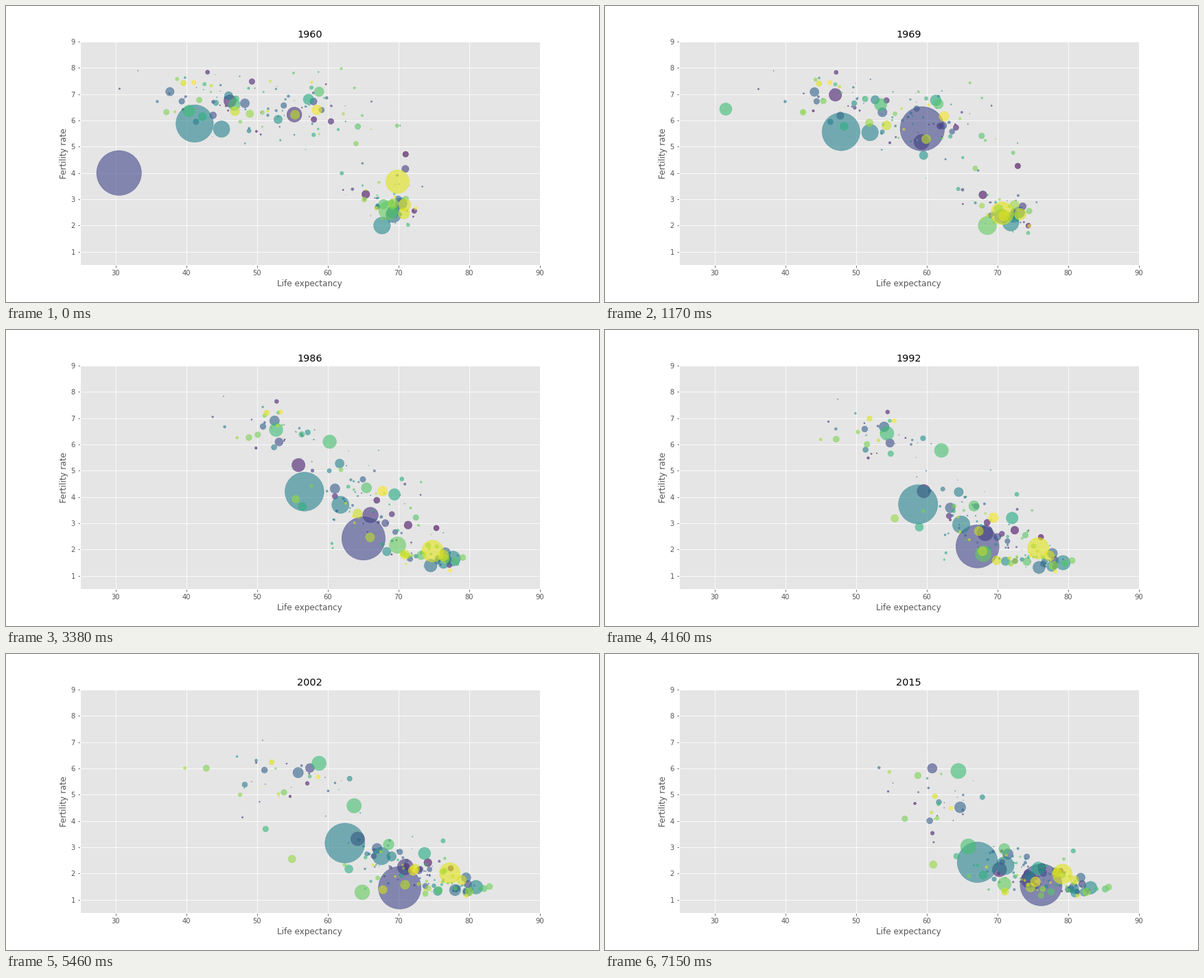
Recreate the animation shown at these times as a matplotlib script. Size 864 px wide and 432 px high, loop 7.28 s.

```python
import numpy as np
import matplotlib.pyplot as plt
from matplotlib.animation import FuncAnimation

FIRST, LAST, STEP_MS = 1960, 2015, 130
years = np.arange(FIRST, LAST + 1)
progress = (years - FIRST) / (LAST - FIRST)
rng = np.random.default_rng(12)
bubbles = []


def add(hue, r0, r1, life, births):
    bubbles.append((hue, life, births, r0 + (r1 - r0) * progress))


def giant(hue, r0, r1, life, births, keys=(1960, 1969, 1977, 1992, 2015)):
    """A large country led through a few key points."""
    add(hue, r0, r1, np.interp(years, keys, life), np.interp(years, keys, births))


def transition(hue, r, life, births, middle, dip=0.0, pace=7.0, growth=1.0):
    """Life expectancy eases up while fertility falls along a logistic curve."""
    crisis = dip * np.exp(-((years - 2001) / 9) ** 2)
    age = life[0] + (life[1] - life[0]) * progress ** .8 - crisis
    fall = 1 / (1 + np.exp(-(years - middle) / pace))
    add(hue, r, r * growth, age, births[0] + (births[1] - births[0]) * fall)


def region(count, life0, life1, births0, births1, middle, dip=0.0):
    """Small countries scattered around one trend; each pair is mean and spread."""
    for _ in range(count):
        rank = rng.normal()  # richer countries live longer and change earlier
        start = life0[0] + life0[1] * rank
        end = life1[0] + life1[1] * (.7 * rank + .7 * rng.normal())
        high = min(rng.normal(*births0) - .2 * births0[1] * rank, 8.2)
        low = max(rng.normal(*births1) - .4 * births1[1] * rank, 1.15)
        transition(rng.random(), np.clip(rng.lognormal(.3, .8), .2, 4.2), (start, end),
                   (high, low), rng.normal(*middle) - 3 * rank,
                   dip * rng.random() ** 3, rng.uniform(5, 8), rng.uniform(.85, 1.2))


# China, with the famine years and the rebound
giant(.205, 32.7, 30.6, [30.5, 32, 50, 59.4, 61.9, 67.2, 70.2, 76.2],
      [4, 3.3, 7.2, 5.68, 2.88, 2.12, 1.46, 1.57],
      keys=(1960, 1961, 1963, 1969, 1977, 1992, 2002, 2015))
# India, United States, Indonesia, Brazil
giant(.435, 27.3, 29.6, [41.2, 47.9, 53.6, 58.8, 67.2], [5.88, 5.57, 4.93, 3.72, 2.43])
giant(.955, 17.2, 14.6, [69.9, 70.7, 73.4, 75.8, 79.2], [3.67, 2.47, 1.78, 2.05, 1.98])
giant(.44, 12, 13.2, [45, 52, 57.2, 64.9, 71.1], [5.67, 5.54, 4.83, 2.95, 2.3])
giant(.135, 10.9, 11.8, [55.3, 59.3, 62.7, 68.3, 74.5], [6.22, 5.18, 4.34, 2.63, 1.76])
# Russia, Japan, Germany
giant(.76, 14, 9.9, [68.6, 68.6, 69.9, 64.9, 71], [2.57, 2, 2.17, 1.29, 1.6],
      keys=(1960, 1969, 1986, 2002, 2015))
giant(.475, 12.3, 9.3, [67.7, 71.9, 75.4, 79.3, 83.2], [2, 2.1, 1.9, 1.5, 1.46])
giant(.36, 11, 7.4, [69.3, 70.6, 72.6, 75.9, 80.8], [2.4, 2.35, 1.5, 1.32, 1.44])
# Pakistan, Bangladesh, Nigeria, Mexico
giant(.7, 8.6, 11.2, [46.8, 53.5, 57.6, 62.1, 65.9], [6.6, 6.6, 6.6, 5.77, 3.03])
giant(.08, 9, 10.4, [46.2, 47.1, 50.3, 59.6, 70.3], [6.74, 6.97, 6.7, 4.22, 2.15])
giant(.685, 8.6, 11.1, [40.4, 31.6, 50.2, 54.4, 64.5], [6.36, 6.43, 6.76, 6.42, 5.9])
giant(.605, 7.7, 9.3, [57.3, 61.3, 65.5, 72.1, 75.8], [6.8, 6.76, 5.44, 3.2, 2.2])

# Vietnam, Philippines, Thailand, Turkey, Iran, South Korea, Myanmar
transition(.985, 7.2, (58.5, 75.4), (6.5, 1.6), 1987)
transition(.73, 7, (58.8, 71), (7.3, 2.9), 1981, growth=1.15)
transition(.9, 6.7, (55.4, 74.7), (6.7, 1.45), 1976)
transition(.925, 6.7, (46.9, 78.5), (6.6, 2), 1980)
transition(.445, 6, (46, 74.6), (7, 1.75), 1991, growth=1.2)
transition(.505, 6.2, (53, 81), (6.9, 1.25), 1972)
transition(.64, 6, (42.3, 68), (6.3, 1.9), 1983)
# Egypt, Ethiopia, Congo, South Africa
transition(.29, 6.6, (48.3, 71.5), (6.8, 2.7), 1983, growth=1.15)
transition(.315, 6.2, (37.7, 65.1), (7.1, 3.9), 2005, dip=4, growth=1.3)
transition(.225, 5, (43.8, 60.8), (6.2, 6), 1985, growth=1.4)
transition(.84, 5.6, (49, 61.3), (6.4, 2.3), 1983, dip=4)
# Colombia, Argentina, Canada
transition(.215, 5.2, (58, 76.5), (7.2, 2), 1976)
transition(.035, 5.8, (65.4, 76.3), (3.2, 2.2), 1993)
transition(.175, 5.2, (71, 82), (4.6, 1.6), 1967, pace=4)
# United Kingdom, Italy, France, Spain, Poland, Ukraine
transition(.945, 9, (70.9, 80.9), (2.85, 1.75), 1971, pace=4, growth=.7)
transition(.465, 8.8, (69.2, 82.3), (2.55, 1.3), 1977, pace=5, growth=.7)
transition(.33, 8.6, (70.4, 81.8), (2.9, 1.85), 1971, pace=4, growth=.75)
transition(.85, 7, (69.3, 82.6), (2.85, 1.3), 1981, pace=4, growth=.8)
transition(.735, 7, (67.9, 77.6), (2.9, 1.3), 1980, growth=.72)
transition(.94, 8.2, (70.8, 71.4), (2.5, 1.3), 1984, dip=3.5, growth=.65)

region(38, (41.5, 5), (61.5, 3.5), (6.9, .5), (4.4, .8), (1999, 6), dip=13)
region(72, (54.5, 6.5), (73.5, 4), (6.7, .8), (2.1, .5), (1983, 6))
region(44, (68.2, 2.8), (78.5, 3.2), (3.1, .7), (1.6, .2), (1973, 4))

bubbles.sort(key=lambda b: b[0])
hue, life, births, radius = (np.array(v) for v in zip(*bubbles))

plt.style.use("ggplot")
plt.rcParams["font.family"] = "DejaVu Sans"
fig, ax = plt.subplots(figsize=(12, 6), dpi=72)
fig.set_facecolor("white")
fig.subplots_adjust(left=.125, right=.9, bottom=.125, top=.88)
ax.set(xlim=(25, 90), ylim=(.5, 9), xlabel="Life expectancy", ylabel="Fertility rate")
title = ax.set_title(str(FIRST))
dots = ax.scatter(life[:, 0], births[:, 0], s=(2 * radius[:, 0]) ** 2,
                  c=plt.get_cmap("viridis")(hue), alpha=.6)


def update(i):
    dots.set_offsets(np.column_stack([life[:, i], births[:, i]]))
    dots.set_sizes((2 * radius[:, i]) ** 2)
    title.set_text(str(years[i]))
    return dots, title


anim = FuncAnimation(fig, update, frames=len(years), interval=STEP_MS,
                     repeat=True, repeat_delay=0, blit=False)
plt.show()
```
